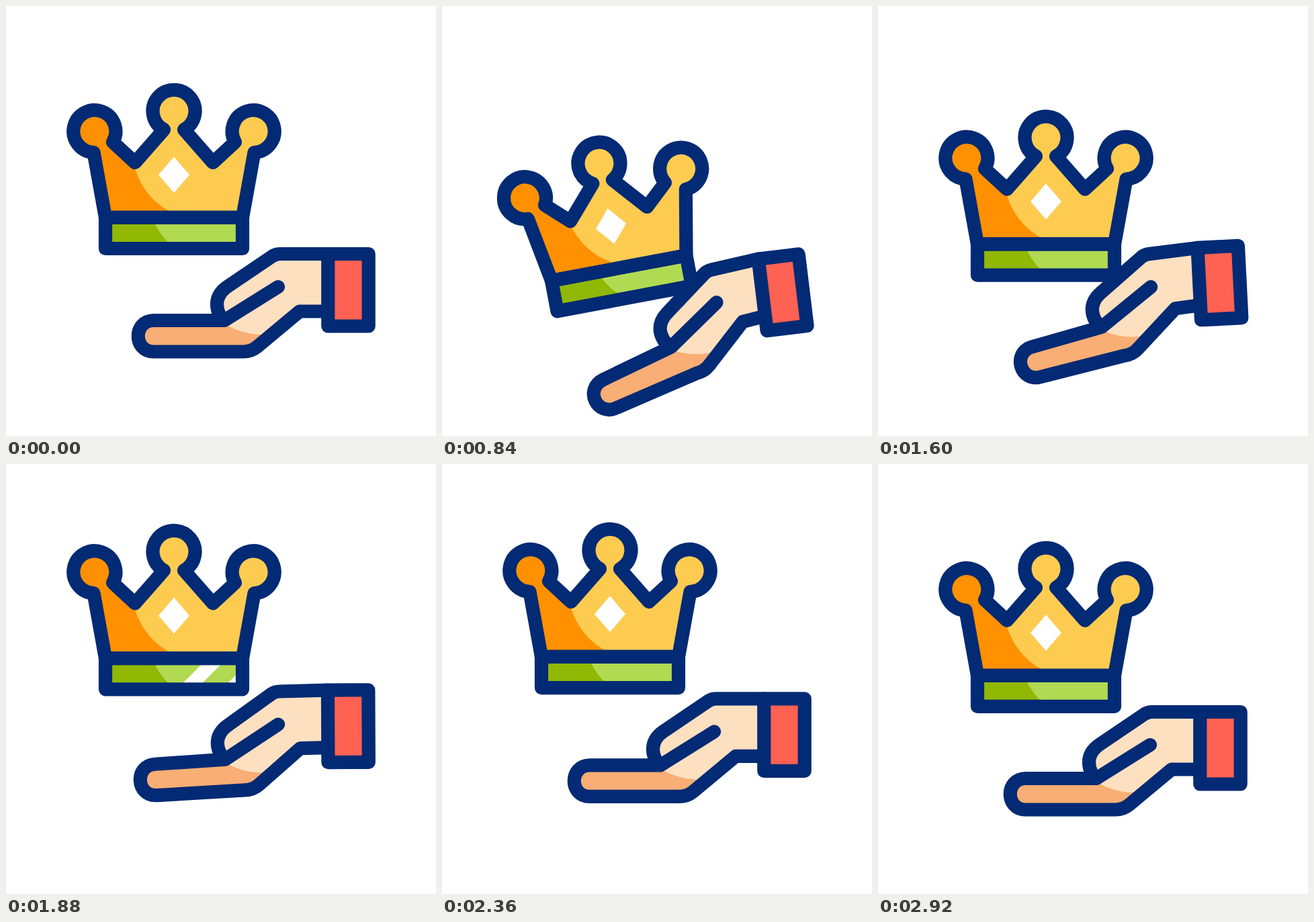
Animation, 640 px wide and 640 px high, one loop 3000 ms. Source, as an HTML page:

```html
<!DOCTYPE html>
<html lang="en">
<head>
<meta charset="utf-8">
<title>Crown and hand</title>
<style>
  html, body { margin: 0; width: 100%; height: 100%; overflow: hidden; background: #fff; }
  svg { display: block; width: 100vw; height: 100vh; }
  .line { fill: none; stroke: #032a74; stroke-width: 20.2; stroke-linecap: round; stroke-linejoin: round; }
</style>
</head>
<body>
<svg viewBox="0 0 640 640">
  <defs>
    <path id="crownShape" d="M148 314.8L130.5 218A31.5 31.5 0 1 1 159 202.5L192 233L235 184A31.5 31.5 0 1 1 265 184L308 233L341 202.5A31.5 31.5 0 1 1 369.5 218L352 314.8Z"/>
    <clipPath id="crownClip"><use href="#crownShape"/></clipPath>
    <clipPath id="bandClip"><rect x="148" y="314.8" width="204" height="46.2"/></clipPath>
  </defs>

  <g id="crown">
    <use href="#crownShape" fill="#fecb51"/>
    <path clip-path="url(#crownClip)" fill="#ff9100" d="M80 130H188V228Q201 286 250 309V320H80Z"/>
    <path fill="#fff" d="M250 224.5L273 251.3L250 278L227 251.3Z"/>
    <g clip-path="url(#bandClip)">
      <rect x="148" y="314" width="204" height="47" fill="#b0da52"/>
      <path fill="#90b804" d="M148 314V361H252Q230 345 217 314Z"/>
      <path id="shine" fill="#fff" d="M-97 361h29l47 -47h-29ZM-30 361h20l47 -47h-20Z"/>
    </g>
    <use href="#crownShape" class="line"/>
    <rect class="line" x="148" y="314.8" width="204" height="46.2"/>
  </g>

  <g id="hand">
    <path id="skin" fill="#fde0c0"/>
    <path id="shade" fill="#f8ae74"/>
    <path id="back" class="line"/>
    <path id="front" class="line"/>
    <path id="cuff" class="line" style="fill:#ff6153"/>
  </g>
</svg>
<script>
const LOOP = 3000, STEP = 40;
const el = id => document.getElementById(id);

// Sine ease from 0 to 1.
function ease(t, start, length) {
  const u = Math.min(1, Math.max(0, (t - start) / length));
  return (1 - Math.cos(Math.PI * u)) / 2;
}

// The joints share one bend and relax; those further out follow later.
const bend = (t, down, up) => ease(t, down, 720) - ease(t, up, 867);

// Turns an offset counter-clockwise and places it at a pivot.
function turn([px, py], x, y, deg) {
  const a = deg * Math.PI / 180, c = Math.cos(a), s = Math.sin(a);
  return [px + x * c + y * s, py - x * s + y * c];
}

function drawHand(t) {
  const cuff = 6.9 * bend(t, 0, 1123);
  const palm = 12.5 * bend(t, 16, 1210);
  const finger = 25.7 * bend(t, 65, 1232);
  const lift = 37 * (ease(t, 1320, 720) - ease(t, 2090, 560));

  const stretch = 1 + finger * finger * 1e-4;
  const onCuff = (x, y) => turn([538, 444], x - 538, y - 444, cuff);
  const wrist = onCuff(479, 412);
  wrist[0] += palm * palm * 0.025;
  const onPalm = (x, y) => turn(wrist, x - 479, y - 412, palm);
  const knuckle = onPalm(325, 468);
  const onFinger = (x, y) => turn(knuckle, (x - 325) * stretch, y - 468, finger);
  const text = f => (x, y) => f(x, y).map(n => n.toFixed(2)).join(" ") + " ";
  const C = text(onCuff), P = text(onPalm), F = text(onFinger);

  const back = `M${C(479, 369)}L${P(408, 369)}Q${P(402, 369)}${P(397, 372)}L${P(329, 418)}`
    + `C${P(319, 425)}${P(314, 433)}${P(314, 444)}Q${P(314, 452)}${P(318, 460)}`;
  const fingers = `L${P(325, 468)}L${F(220, 468)}C${F(189, 468)}${F(189, 514.5)}${F(220, 514.5)}`
    + `L${P(353, 514.5)}Q${P(365, 514.5)}${P(374, 507)}`;
  const heel = `L${P(437, 454.5)}L${C(479, 454.5)}`;

  el("back").setAttribute("d", back);
  el("front").setAttribute("d", `M${P(405, 418)}${fingers}${heel}`);
  el("skin").setAttribute("d", `${back}${fingers}${heel}Z`);
  el("shade").setAttribute("d", `M${P(318, 468)}${fingers}L${P(395, 489)}Q${P(350, 492)}${P(318, 468)}Z`);
  el("cuff").setAttribute("d", `M${C(479.3, 369)}L${C(539.7, 369)}L${C(539.7, 476.5)}L${C(479.3, 476.5)}Z`);
  el("hand").setAttribute("transform", `translate(0 ${-lift})`);
}

function drawCrown(t) {
  const drop = 76.5 * ease(t, 16, 720);
  const raise = 105 * ease(t, 1370, 570);
  const toss = 71.5 * ease(t, 1900, 340);
  const settle = 100 * (1 - Math.exp(-Math.max(0, t - 2240) / 94));
  const sway = t > 644 && t < 1544 ? -12 * Math.sin((t - 644) / 600 * 2 * Math.PI) : 0;
  const y = drop - raise - toss + settle;
  el("crown").setAttribute("transform", `translate(0 ${y}) rotate(${sway} 250 243)`);

  const start = t < 1605 ? 420 : 1605;
  const sweep = t < start ? 0 : 131 + 0.8 * (t - start);
  el("shine").setAttribute("transform", `translate(${sweep} 0)`);
}

const begin = performance.now();
function draw() {
  const now = Math.max(0, performance.now() - begin) % LOOP;
  const t = Math.floor(now / STEP) * STEP;
  drawCrown(t);
  drawHand(t);
  requestAnimationFrame(draw);
}
draw();
</script>
</body>
</html>
```
